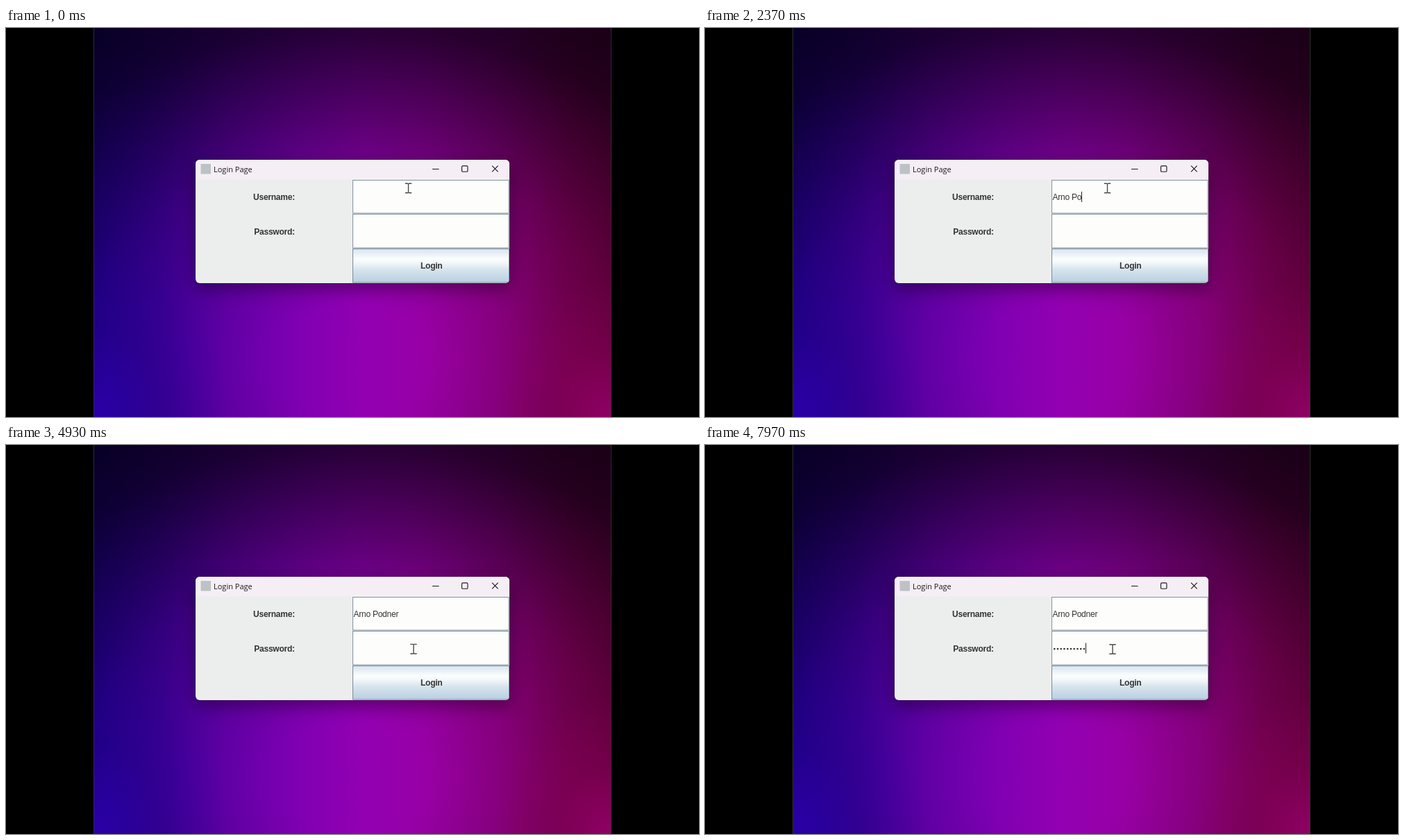
An HTML page that plays this animation: 998x561 px, repeating every 8000 ms.

```html
<!DOCTYPE html>
<html lang="en">
<head>
<meta charset="utf-8">
<title>Login Page</title>
<style>
  html, body { margin: 0; width: 100%; height: 100%; overflow: hidden; background: #000; }
  /* Corner glows over a dark vignette over a horizontal hue ramp. */
  #wallpaper {
    position: absolute; left: 126px; top: 0; width: 744px; height: 561px;
    border: solid #2c2c2e; border-width: 0 1px;
    background:
      radial-gradient(190px 260px at 0 100%, rgba(44, 0, 176, .85), rgba(36, 0, 150, .35) 50%, rgba(30, 0, 120, 0)),
      radial-gradient(170px 200px at 100% 100%, rgba(152, 0, 108, .85), rgba(140, 0, 90, .35) 50%, rgba(120, 0, 70, 0)),
      radial-gradient(700px 540px at 50% 85%, rgba(0, 0, 8, 0) 15%, rgba(0, 0, 8, .1) 35%, rgba(0, 0, 8, .27) 55%, rgba(0, 0, 8, .5) 72%, rgba(0, 0, 8, .73) 88%, rgba(0, 0, 8, .8)),
      linear-gradient(to right, #2a00a8, #4200a8 12%, #6600ae 26%, #8000b2 40%, #9200b2 52%, #9800a6 64%, #920088 78%, #88005c 92%, #840050);
  }
  #window {
    position: absolute; left: 273px; top: 190px; width: 452px; height: 178px;
    border-radius: 6px; background: #eceeee;
    box-shadow: 0 9px 24px rgba(0, 0, 0, .36), 0 0 2px rgba(0, 0, 0, .5);
  }
  svg { position: absolute; left: 0; top: 0; }
  text { font: 12px "Liberation Sans", Arial, sans-serif; letter-spacing: -.25px; fill: #333; white-space: pre; }
  .label { font-weight: bold; text-anchor: middle; }
  .title { font: 11px "Open Sans", "Noto Sans", sans-serif; letter-spacing: 0; fill: #1b1a1b; }
  .field { fill: #fdfefc; stroke: #8492a0; }
  .control { fill: none; stroke: #1c1b1c; stroke-width: 1.15; }
</style>
</head>
<body>
<div id="wallpaper"></div>
<div id="window"></div>
<svg width="998" height="561" viewBox="0 0 998 561">
  <defs>
    <linearGradient id="metal" x2="0" y2="1">
      <stop offset="0" stop-color="#d6e3ee"/>
      <stop offset=".3" stop-color="#fcfefe"/>
      <stop offset=".42" stop-color="#f2f7f9"/>
      <stop offset=".62" stop-color="#d6e4ec"/>
      <stop offset="1" stop-color="#b8cfe2"/>
    </linearGradient>
    <clipPath id="frame"><rect x="273" y="190" width="452" height="178" rx="6"/></clipPath>
  </defs>
  <g clip-path="url(#frame)">
    <rect x="272" y="190" width="454" height="28.5" fill="#f5eff5"/>
    <rect class="field" x="499.5" y="219.5" width="224.5" height="47.5"/>
    <rect class="field" x="499.5" y="268.5" width="224.5" height="48.5"/>
    <rect x="499.5" y="318.5" width="225" height="48.5" fill="url(#metal)" stroke="#7a8a99"/>
  </g>
  <rect x="280.5" y="196" width="14.5" height="14.5" fill="#bcc2c6"/>
  <text class="title" x="299" y="207.5">Login Page</text>
  <path class="control" d="M614 203.5h9.5M700 198.7l8.6 8.6m0-8.6l-8.6 8.6"/>
  <rect class="control" x="656.5" y="198.9" width="8.4" height="8.4" rx="1.4"/>
  <text class="label" x="386" y="248">Username:</text>
  <text class="label" x="386.5" y="297.5">Password:</text>
  <text class="label" x="612.7" y="347">Login</text>
  <text id="username" x="500.5" y="248"></text>
  <g id="dots" fill="#333"></g>
  <rect id="caret" width="1" height="15" fill="#222"/>
  <g id="pointer" fill="none" stroke-linecap="square">
    <path d="M-4-6.8h3l1 1 1-1h3M0-5.8v11.6M-4 6.8h3l1-1 1 1h3" stroke="#fff" stroke-width="2.6" opacity=".7"/>
    <path d="M-4-6.8h3l1 1 1-1h3M0-5.8v11.6M-4 6.8h3l1-1 1 1h3" stroke="#4a4a4a" stroke-width="1.4"/>
  </g>
</svg>
<script>
const LOOP = 8000, BLINK = 500, CLICK = 5000;
const NAME = "Arno Podner";
const nameKeys = [270, 430, 700, 930, 1500, 1850, 2150, 2500, 2750, 3000, 3270];
const passwordKeys = Array.from({ length: 10 }, (_, i) => 6050 + i * 180);
const move = { start: 4500, end: 4950, from: [579.5, 231], to: [587, 294.5] };
const DOT_PITCH = 4.75;

const [username, dots, caret, pointer] =
  ["username", "dots", "caret", "pointer"].map(id => document.getElementById(id));

passwordKeys.forEach((_, i) => {
  const dot = document.createElementNS("http://www.w3.org/2000/svg", "circle");
  dot.setAttribute("cx", 503.2 + i * DOT_PITCH);
  dot.setAttribute("cy", 294);
  dot.setAttribute("r", 1.35);
  dots.append(dot);
});

const typed = (keys, t) => keys.filter(k => k <= t).length;
const ease = p => p * p * (3 - 2 * p);

function draw(t) {
  const letters = typed(nameKeys, t), hidden = typed(passwordKeys, t);
  username.textContent = NAME.slice(0, letters);
  [...dots.children].forEach((dot, i) => dot.setAttribute("visibility", i < hidden ? "visible" : "hidden"));

  // The caret shows again at each key press, then blinks.
  const inPassword = t >= CLICK;
  const last = Math.max(-BLINK, ...[...nameKeys, CLICK, ...passwordKeys].filter(k => k <= t));
  const shown = Math.floor((t - last) / BLINK) % 2 === 0;
  const width = inPassword ? hidden * DOT_PITCH : letters && username.getComputedTextLength();
  caret.setAttribute("x", Math.round(500.3 + width));
  caret.setAttribute("y", inPassword ? 285.5 : 236);
  caret.setAttribute("visibility", shown ? "visible" : "hidden");

  const p = ease(Math.min(1, Math.max(0, (t - move.start) / (move.end - move.start))));
  const [x, y] = move.from.map((a, i) => a + (move.to[i] - a) * p);
  pointer.setAttribute("transform", `translate(${x} ${y})`);
}

const begin = performance.now();
function tick() {
  draw((performance.now() - begin) % LOOP);
  requestAnimationFrame(tick);
}
tick();
</script>
</body>
</html>
```
